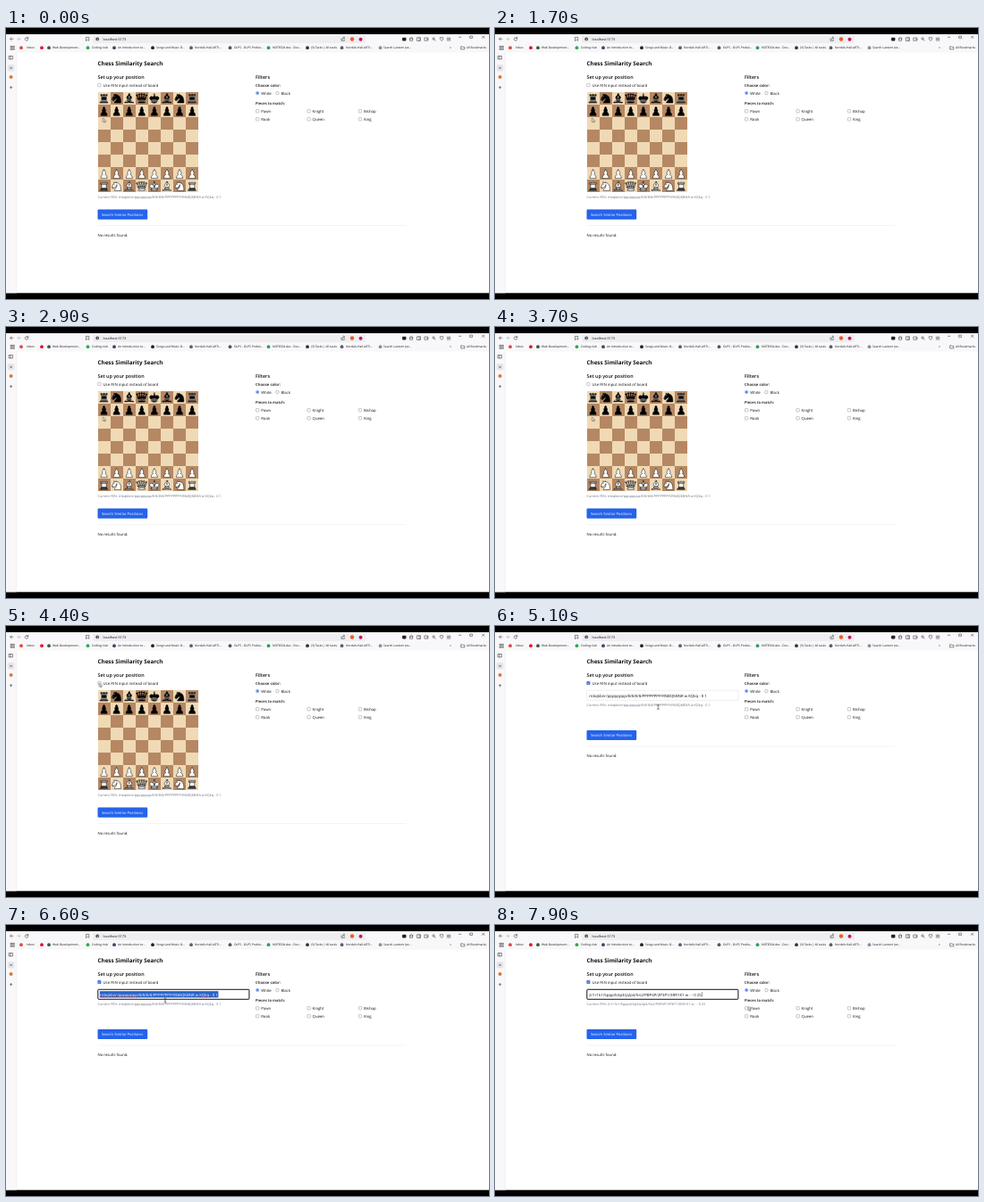
An HTML page that plays this animation: 540 by 304 pixels, repeating every 8 s.

```html
<!DOCTYPE html>
<html lang="en">
<head>
<meta charset="utf-8">
<title>Chess Similarity Search</title>
<style>
html, body { margin: 0; width: 100%; height: 100%; overflow: hidden; background: #000; }
svg { display: block; width: 100%; height: 100%; }
text { font-family: "Open Sans", "Noto Sans", sans-serif; fill: #111; text-rendering: geometricPrecision; white-space: pre; }
.semi { font-weight: 600; }
.bold { font-weight: 700; }
.line { fill: none; stroke: #444; stroke-width: .6; stroke-linecap: round; stroke-linejoin: round; }
.step { animation: 8s step-end infinite; }
.board { animation-name: board; }
.form { animation-name: form; }
.plain { animation-name: plain; }
.focus { animation-name: focus; }
.picked { animation-name: picked; }
.pasted { animation-name: pasted; }
.old { animation-name: old; }
.arrow { animation-name: arrow; }
.beam { animation-name: beam; }
.lower { animation-name: lower; }
.pointer { animation: move 8s ease-in-out infinite; }
@keyframes board { 0% { visibility: visible } 57.5%, 100% { visibility: hidden } }
@keyframes form { 0% { visibility: hidden } 57.5%, 100% { visibility: visible } }
@keyframes plain { 0% { visibility: hidden } 57.5% { visibility: visible } 72.5%, 100% { visibility: hidden } }
@keyframes focus { 0% { visibility: hidden } 70%, 100% { visibility: visible } }
@keyframes picked { 0% { visibility: hidden } 72.5% { visibility: visible } 90%, 100% { visibility: hidden } }
@keyframes pasted { 0% { visibility: hidden } 90%, 100% { visibility: visible } }
@keyframes old { 0% { visibility: hidden } 57.5% { visibility: visible } 90%, 100% { visibility: hidden } }
@keyframes arrow { 0% { visibility: visible } 61.5% { visibility: hidden } 93.5%, 100% { visibility: visible } }
@keyframes beam { 0% { visibility: hidden } 61.5% { visibility: visible } 93.5%, 100% { visibility: hidden } }
@keyframes lower { 0% { transform: translateY(86.7px) } 57.5%, 100% { transform: none } }
@keyframes move {
  0%, 46.25% { transform: translate(108.5px, 101px) }
  53.75%, 58.75% { transform: translate(104.3px, 63.8px) }
  63%, 66.25% { transform: translate(182.5px, 91px) }
  70%, 76.25% { transform: translate(178px, 80px) }
  80%, 91.25% { transform: translate(178px, 84.5px) }
  97.5%, 100% { transform: translate(283.2px, 91.6px) }
}
</style>
</head>
<body>
<svg id="stage" viewBox="0 0 540 304"></svg>
<script>
const START = "rnbqkbnr/pppppppp/8/8/8/8/PPPPPPPP/RNBQKBNR w KQkq - 0 1";
const NEXT = "2r1r1k1/5ppp/b3p3/p2p4/5n2/PBP4P/2P3P1/3RR1K1 w - - 0 25";
const BLUE = "#2563eb";

const rect = (x, y, w, h, fill, more = "") =>
  `<rect x="${x}" y="${y}" width="${w}" height="${h}" fill="${fill}" ${more}/>`;
const dot = (x, y, r, fill, more = "") => `<circle cx="${x}" cy="${y}" r="${r}" fill="${fill}" ${more}/>`;
const text = (x, y, size, str, more = "") => `<text x="${x}" y="${y}" font-size="${size}" ${more}>${str}</text>`;
const line = (d, more = "") => `<path class="line" d="${d}" ${more}/>`;
const group = (cls, ...parts) => `<g class="${cls}">${parts.join("")}</g>`;
const step = (name, ...parts) => group("step " + name, ...parts);

// Chess pieces on a 45 unit square: [body, detail]
const balls = [[6, 12], [14, 9], [22.5, 8], [31, 9], [39, 12]]
  .map(([x, y]) => `M${x - 2.5} ${y}a2.5 2.5 0 1 0 5 0a2.5 2.5 0 1 0-5 0z`).join("");
const PIECES = {
  p: ["M22.5 9c-2.2 0-4 1.8-4 4 0 .9.3 1.7.8 2.4C17.3 16.5 16 18.6 16 21c0 2 .9 3.8 2.4 5C15.4 27.1 11 31.6 11 39.5h23c0-7.9-4.4-12.4-7.4-13.5 1.5-1.2 2.4-3 2.4-5 0-2.4-1.3-4.5-3.3-5.6.5-.7.8-1.5.8-2.4 0-2.2-1.8-4-4-4z", ""],
  r: ["M9 39h27v-3H9zM12 36v-4h21v4zM11 14V9h4v2h5V9h5v2h5V9h4v5l-3 3v12.5l1.5 2.5h-20l1.5-2.5V17z",
    "M12 35.5h21M13 31.5h19M14 29.5h17M14 17h17M11 14h23"],
  n: ["M22 10c10.5 1 16.5 8 16 29H15c0-9 10-6.5 8-21M24 18c.4 2.9-5.6 7.4-8 9-3 2-2.8 4.3-5 4-1-.9 1.4-3 0-3-1 0 .2 1.2-1 2-1 0-4 1-4-4 0-2 6-12 6-12s1.9-1.9 2-3.5c-.7-1-.5-2-.5-3 1-1 3 2.5 3 2.5h2s.8-2 2.5-3c1 0 1 3 1 3",
    "M9 25.5v.5M14.8 15l-.6 1.4"],
  b: ["M9 36c3.4-1 10.1.4 13.5-2 3.4 2.4 10.1 1 13.5 2 0 0 1.6.5 3 2-.7 1-1.6 1-3 .5-3.4-1-10.1.5-13.5-1-3.4 1.5-10.1 0-13.5 1-1.4.5-2.3.5-3-.5 1.4-1.5 3-2 3-2zM15 32c2.5 2.5 12.5 2.5 15 0 .5-1.5 0-2 0-2 0-2.5-2.5-4-2.5-4 5.5-1.5 6-11.5-5-15.5-11 4-10.5 14-5 15.5 0 0-2.5 1.5-2.5 4 0 0-.5.5 0 2zM25 8a2.5 2.5 0 1 1-5 0 2.5 2.5 0 1 1 5 0z",
    "M17.5 26h10M15 30h15M22.5 15.5v5M20 18h5"],
  q: [balls + "M9 26c8.5-1.5 21-1.5 27 0l2.5-12.5L31 25l-.3-14-5.2 13.5-3-14.5-3 14.5L14.3 11 14 25 6.5 13.5zM9 26c0 2 1.5 2 2.5 4 1 1.5 1 1 .5 3.5-1.5 1-1.5 2.5-1.5 2.5-1.5 1.5.5 2.5.5 2.5 6.5 1 16.5 1 23 0 0 0 1.5-1 0-2.5 0 0 .5-1.5-1-2.5-.5-2.5-.5-2 .5-3.5 1-2 2.5-2 2.5-4-8.5-1.5-18.5-1.5-27 0z",
    "M11.5 30c3.5-1 18.5-1 22 0M12 33.5c6-1 15-1 21 0"],
  k: ["M22.5 11.6V6M20 8h5M22.5 25s4.5-7.5 3-10.5c0 0-1-2.5-3-2.5s-3 2.5-3 2.5c-1.5 3 3 10.5 3 10.5M11.5 37c5.5 3.5 15.5 3.5 21 0v-7s9-4.5 6-10.5c-4-6.5-13.5-3.5-16 4V27v-3.5c-3.5-7.5-13-10.5-16-4-3 6 5 10 5 10z",
    "M11.5 30c5.5-3 15.5-3 21 0M11.5 33.5c5.5-3 15.5-3 21 0M11.5 37c5.5-3 15.5-3 21 0"]
};

function piece(kind, white, x, y, cell) {
  const [body, detail] = PIECES[kind];
  return `<g transform="translate(${x} ${y}) scale(${cell / 45})" stroke-width="1.6" stroke-linecap="round" stroke-linejoin="round">
    <path d="${body}" fill="${white ? "#fff" : "#000"}" stroke="#000"/>
    <path d="${detail}" fill="none" stroke="${white ? "#000" : "#e8e8e8"}"/></g>`;
}

function chessboard(x0, y0, cell) {
  const rows = { 0: "rnbqkbnr", 1: "pppppppp", 6: "pppppppp", 7: "rnbqkbnr" };
  let squares = "", men = "";
  for (let r = 0; r < 8; r++) for (let c = 0; c < 8; c++) {
    const x = x0 + c * cell, y = y0 + r * cell;
    squares += rect(x, y, cell, cell, (r + c) % 2 ? "#b58863" : "#f0d9b5", 'shape-rendering="crispEdges"');
    if (rows[r]) men += piece(rows[r][c], r > 3, x, y, cell);
  }
  return squares + men;
}

const box = (x, y) => rect(x - 1.7, y - 1.7, 3.4, 3.4, "#fff", 'rx=".5" stroke="#767676" stroke-width=".4"');
const option = (x, y, label) => box(x, y) + text(x + 4, y + 1.5, 4.28, label);
const radio = (x, y, label, on) =>
  dot(x, y, 1.75, "#fff", `stroke="${on ? BLUE : "#767676"}" stroke-width=".45"`) +
  (on ? dot(x, y, 1.05, BLUE) : "") + text(x + 4, y + 1.5, 4.28, label);

function wave(x, y, width) {
  let d = `M${x} ${y}q.5-1 1 0`;
  for (let i = 1; i < width; i++) d += "t1 0";
  return line(d, 'style="stroke:#e02020;stroke-width:.5"');
}

function chrome() {
  const marks = [
    [17, "#e0483c", "Inbox", 23], [40, "#e8112d", "", 0], [48, "#3b5a45", "Web Development...", 52],
    [91.5, "#2fa84f", "Coding club", 96], [121, "#3a4a63", "An Introduction to...", 125],
    [164, "#222", "Songs and Music O...", 168], [207, "#55606e", "Nordvik-Hall-ARTI...", 211],
    [250.5, "#50565c", "OLPS - OLPS Proble...", 255], [293.5, "#2f9e57", "NOTES04.dev - Doc...", 298],
    [337, "#333", "(3) Tasks | All tasks", 341], [375.5, "#55606e", "Nordvik-Hall-ARTI...", 380],
    [418.5, "#8a8f98", "Search Lantern (ex...", 422]
  ];
  return [
    rect(0, 7, 540, 290.3, "#fff"),
    rect(0, 7, 540, 20.5, "#f8f8fa"),
    rect(0, 27.5, 11.5, 269.8, "#f8f8fa"),
    rect(11.3, 27.5, .4, 269.8, "#e4e4e8"),
    rect(97, 8.3, 305, 8.6, "#eeeef1", 'rx="1.5"'),
    line("M8 12.3H4.8M6.2 10.8L4.7 12.3l1.5 1.5"),
    line("M12.5 12.3h3.2M14.3 10.8l1.5 1.5-1.5 1.5", 'opacity=".4"'),
    line("M24.6 11.5a1.8 1.8 0 1 0 .2 1.4M24.8 10.2v1.5h-1.5"),
    line("M89.8 10.4h3v3.9l-1.5-1.1-1.5 1.1z"),
    dot(102.2, 12.4, 1.9, "#555"), rect(102, 12, .5, 1.6, "#fff"),
    text(108.5, 13.8, 3.8, "localhost:5173"),
    line("M375 12v2.3h3.3V13M376 12.8c.2-1.4 1-1.9 2.4-1.9M377.5 10l1 .9-1 1"),
    dot(387, 12.5, 2.2, "#f0592b"), dot(396.5, 12.7, 2, "#c2185b"),
    rect(443, 10.8, 4.4, 3.6, "#222", 'rx=".8"'),
    line("M451.5 12v2.3h3V12M453 10.5l-1.8 1.5h3.6z"),
    line("M459.7 10.8h3.8v3.6h-3.8zM462 10.8v3.6"),
    line("M468.2 11h3.6v3.2h-3.6zM470.5 12.6h1.3"),
    dot(478, 12, 1.2, "none", 'stroke="#444" stroke-width=".6"'), line("M479 13l1 1.2"),
    line("M485.6 10.7h3v2.2l-1.5 1.6-1.5-1.6z"),
    line("M493.2 11.2h3.6M493.2 12.6h3.6M493.2 14h3.6"),
    line("M506.4 10.3h2.4M519 9h2.4v2.4H519zM532.4 9l2.4 2.4M534.8 9l-2.4 2.4"),
    line("M5.4 20.3h1.4v1.4H5.4zM8 20.3h1.4v1.4H8zM5.4 22.9h1.4v1.4H5.4zM8 22.9h1.4v1.4H8z"),
    ...marks.map(([x, color, label, tx]) => dot(x, 22.2, 1.9, color) + (label && text(tx, 23.4, 3.3, label))),
    text(496, 23.4, 3.6, "»"),
    line("M509 20.8h1.3l.5.6h2v2.5H509z"),
    text(515, 23.4, 3.3, "All Bookmarks"),
    line("M3.5 31.5h4v3.4h-4zM5 31.5v3.4"),
    rect(1.8, 41, 7.6, 7.6, "#e6e6eb", 'rx="1.5"'),
    line("M4.7 44l1.8 1.8M6.5 44l-1.8 1.8"),
    dot(5.6, 55, 2, "#d9793a"),
    line("M4.3 66.7h2.6M5.6 65.4V68")
  ].join("");
}

const current = (y, fen) => text(102.5, y, 3.775, "Current FEN: " + fen, 'style="fill:#6b7280"');
const value = (fen, color = "#111") => text(105, 79.5, 4.33, fen, `style="fill:${color}"`);

const page = [
  text(102.5, 42.2, 6.3, "Chess Similarity Search", 'class="bold"'),
  text(102.5, 56.8, 5.38, "Set up your position", 'class="semi"'),
  box(104.4, 64),
  text(108.5, 65.6, 4.28, "Use FEN input instead of board"),

  text(279, 56.8, 5.38, "Filters", 'class="semi"'),
  text(279, 65.6, 4.3, "Choose color:", 'class="semi"'),
  radio(281.2, 73, "White", true), radio(303.4, 73, "Black"),
  text(279, 86, 4.2, "Pieces to match:", 'class="semi"'),
  ...["Pawn", "Knight", "Bishop", "Rook", "Queen", "King"].map((name, i) =>
    option(281.2 + (i % 3) * 57.4, i < 3 ? 93.3 : 102.3, name)),

  step("board", chessboard(102.5, 71.8, 14.08), current(190.5, START)),

  step("form",
    rect(102.6, 62.2, 3.6, 3.6, BLUE, 'rx=".5"'),
    line("M103.4 64l.8.8 1.3-1.6", 'style="stroke:#fff"'),
    rect(102.7, 72.2, 169.3, 11.2, "#fff", 'rx=".8" stroke="#d1d5db" stroke-width=".4"')),
  step("old", current(90.2, START)),
  step("plain", value(START)),
  step("focus", rect(102.8, 72.3, 169.1, 11, "none", 'rx=".8" stroke="#101828" stroke-width="1"')),
  step("picked",
    rect(104.8, 74.2, 132.6, 7.2, "#2563c9"),
    value(START, "#fff"), wave(105, 80.7, 42), wave(216.4, 80.7, 11)),
  step("pasted", value(NEXT), rect(231.2, 75.2, .4, 5.4, "#111"), current(90.2, NEXT)),

  step("lower",
    rect(102.5, 116.9, 55.7, 11.2, BLUE, 'rx="1.1"'),
    text(107, 124.1, 4.18, "Search Similar Positions", 'style="fill:#fff"'),
    rect(102.5, 134.8, 345, .4, "#dfe2e7"),
    text(102.5, 146.9, 4.24, "No results found.")),

  group("pointer",
    step("arrow", '<path d="M0 0v4.4l1-.9.7 1.6.8-.4-.7-1.5h1.4z" fill="#fff" stroke="#222" stroke-width=".45"/>'),
    step("beam", line("M-.9-2.4q.9 0 .9.5v3.8q0 .5-.9.5M.9-2.4q-.9 0-.9.5M.9 2.4q-.9 0-.9-.5", 'style="stroke:#222"')))
].join("");

document.getElementById("stage").innerHTML = rect(0, 0, 540, 304, "#000") + chrome() + page;
</script>
</body>
</html>
```
